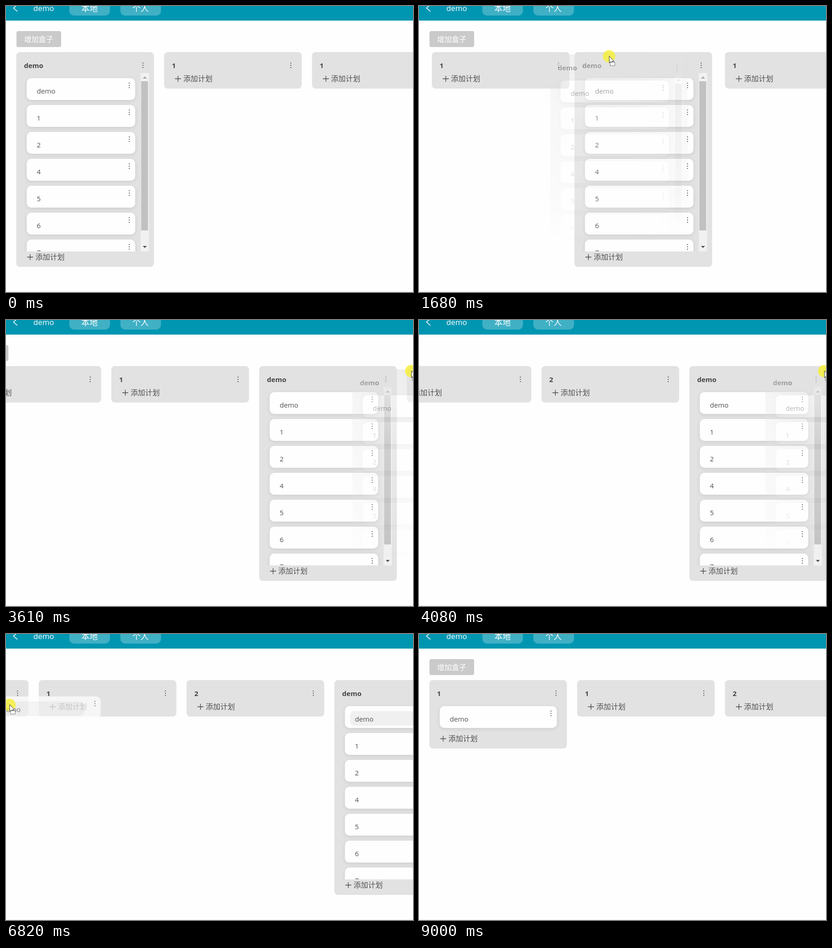
Recreate the animation shown at these times as an HTML page. Size 893 px wide and 627 px high, loop 9.38 s.

```html
<!DOCTYPE html>
<html lang="zh-CN">
<head>
<meta charset="utf-8">
<title>Board</title>
<style>
html, body { margin: 0; width: 100%; height: 100%; overflow: hidden; background: #fefefe; }
body { position: relative; font: 15.1px/24px "Open Sans", "Noto Sans CJK SC", "Noto Sans CJK", sans-serif; color: #505050; }
div, svg { position: absolute; box-sizing: border-box; white-space: nowrap; }
svg { overflow: visible; }
#bar { left: 0; top: 0; width: 100%; height: 32px; background: #0096b2; color: #fff; font-size: 16.8px; overflow: hidden; }
#bar .name { left: 60px; top: -7px; }
.tab { top: -12px; width: 89.5px; height: 33px; border-radius: 10px; background: #40b0c5; font-size: 18px; line-height: 34px; text-align: center; }
#rule { left: 0; top: 626px; width: 100%; height: 1px; background: #eee; }
#board { left: 0; top: 0; }
#add { left: 22.5px; top: 54.5px; width: 98.5px; height: 35.5px; border-radius: 4px; background: #cacaca; color: #fff; font-size: 16px; line-height: 36px; text-align: center; }
.col { left: 0; top: 101px; width: 302px; height: 80px; border-radius: 8px; background: #e2e2e2; }
.col.full { height: 471px; }
.col.one { height: 150px; }
.title { left: 17px; top: 17px; font-weight: 700; font-size: 15px; color: #444; }
.more { width: 2px; height: 2px; background: #555; box-shadow: 0 -5px #555, 0 5px #555; }
.col > .more { left: 276.5px; top: 28px; }
.plan { left: 24px; bottom: 10px; height: 24px; font-size: 16px; font-weight: 300; }
.plan div { left: 18px; }
.plan svg { left: 0; top: 5.5px; }
.list { left: 0; top: 46px; width: 302px; height: 391px; overflow: hidden; }
.one .list { height: 80px; }
.card { left: 22.5px; top: 11px; width: 238.5px; height: 48px; border-radius: 10px; background: #fefefe; box-shadow: 0 2px 8px rgba(0,0,0,.1); }
.one .card { width: 257.5px; }
.card .text { left: 22.5px; top: 15.5px; }
.card .more { right: 12px; top: 15px; }
.pill { left: 11px; right: 35.5px; top: 11px; height: 32px; border-radius: 10px; background: #f0f0f0; display: none; }
.picked .pill { display: block; }
.track { left: 272.5px; top: 0; width: 18px; height: 391px; background: #f1f1f1; }
.thumb { left: 1.5px; top: 18px; width: 15px; height: 327px; background: #c1c1c1; }
.ghost.col, .ghost.card { left: 0; top: 0; }
.ghost.col { mask-image: radial-gradient(circle at 129.5px 4px, rgba(0,0,0,.65) 0, rgba(0,0,0,.42) 100px, rgba(0,0,0,.23) 165px, rgba(0,0,0,.13) 330px, transparent 420px); }
.ghost.card { opacity: .72; clip-path: inset(0); }
#cursor { left: 0; top: 0; }
</style>
</head>
<body>
<div id="board"><div id="add">增加盒子</div></div>
<div id="rule"></div>
<div id="bar">
  <svg width="30" height="32"><path d="M25-3 16.5 4.5 25 12" fill="none" stroke="#fff" stroke-width="1.6"/></svg>
  <div class="name">demo</div>
  <div class="tab" style="left:138.5px">本地</div>
  <div class="tab" style="left:250.5px">个人</div>
</div>
<svg id="cursor" width="1" height="1">
  <circle cy=".5" r="13.5" fill="rgba(246,240,50,.8)"/>
  <path d="M.5 0V15L4 12l2.5 5.5 2-1-2.3-5H11Z" fill="#fff" stroke="#222" stroke-width=".9"/>
  <rect id="badge" x="2.5" y="13.5" width="10" height="7.5" fill="#fff" stroke="#222" stroke-dasharray="1.5 1"/>
</svg>
<script>
const LOOP = 9380, STEP = 77;
const LEFT = 22.5, PITCH = 324.4, MAX_SCROLL = 402.5;
const SWAP = 150;

// Each move starts where the last one stopped.
const origin = { x: 723, y: 587 };
const moves = [
  { from: 340, to: 570, x: 230, y: 191 },
  { from: 740, to: 1210, x: 152, y: 109 },
  { from: 1360, to: 2290, x: 841, y: 111 },    // drag the column
  { from: 2370, to: 2600, x: 880, y: 111.5 },
  { from: 2677, to: 3380, x: 889, y: 111.5 },
  { from: 3530, to: 4080, x: 889, y: 111.5 },  // rest while the board scrolls
  { from: 4250, to: 4560, x: 654, y: 178 },
  { from: 4790, to: 5255, x: 400, y: 122 },    // drag the card
  { from: 5332, to: 5720, x: 172, y: 182 },
  { from: 5790, to: 6660, x: 8, y: 155 },
  { from: 6750, to: 7210, x: 6.5, y: 154 },
  { from: 7530, to: 7830, x: 200, y: 138 },
  { from: 8010, to: 8390, x: 290, y: 180 },
  { from: 8540, to: 9000, x: 830, y: 690 }
];

const $ = id => document.getElementById(id);
const board = $('board'), cursor = $('cursor'), badge = $('badge');

function make(cls, parent, text = '') {
  const el = document.createElement('div');
  el.className = cls;
  el.textContent = text;
  parent.append(el);
  return el;
}
function makeCard(parent, text, row) {
  const card = make('card', parent);
  if (row) card.style.top = 11 + 59 * row + 'px';
  make('pill', card);
  make('text', card, text);
  make('more', card);
  return card;
}
function makeColumn(title, cards = []) {
  const col = make('col', board);
  make('title', col, title);
  make('more', col);
  const list = make('list', col);
  cards.forEach((text, row) => makeCard(list, text, row));
  if (cards.length) {
    col.classList.add('full');
    const track = make('track', list);
    make('thumb', track);
    track.insertAdjacentHTML('beforeend',
      '<svg width="18" height="391"><path d="M4.5 12 9 7.5 13.5 12Z" fill="#a3a3a3"/><path d="M4.5 379H13.5L9 383.5Z" fill="#505050"/></svg>');
  }
  const plan = make('plan', col);
  plan.innerHTML = '<svg width="13" height="13"><path d="M0 6.5H13M6.5 0V13" stroke="#444" stroke-width="1.3"/></svg><div>添加计划</div>';
  return col;
}
function makeGhost(el) {
  const ghost = el.cloneNode(true);
  ghost.classList.add('ghost');
  document.body.insertBefore(ghost, cursor);
  return ghost;
}

const demo = makeColumn('demo', ['demo', '1', '2', '4', '5', '6', '7']);
const others = ['1', '1', '2'].map(title => makeColumn(title));
const source = demo.querySelector('.card');
const dropped = makeCard(others[0].querySelector('.list'), 'demo', 0);
const colGhost = makeGhost(demo), cardGhost = makeGhost(source);
cardGhost.classList.add('picked');

const clamp = (v, max) => Math.min(max, Math.max(0, v));
const place = (el, x, y = 0) => el.style.transform = `translate(${x}px,${y}px)`;
const show = (el, on) => el.style.visibility = on ? 'visible' : 'hidden';

// Stepped time and pointer position; both hold between moves.
function pose(now) {
  const i = moves.findLastIndex(m => now >= m.from);
  if (i < 0) return { t: 0, ...origin };
  const move = moves[i], start = moves[i - 1] || origin;
  const gaps = Math.round((move.to - move.from) / STEP);
  const size = (move.to - move.from) / gaps;
  const k = Math.min(gaps, Math.floor((now - move.from + 8) / size));
  const p = (k + 1) / (gaps + 1);
  return {
    t: move.from + k * size,
    x: start.x + (move.x - start.x) * p,
    y: start.y + (move.y - start.y) * p
  };
}
function draw(now) {
  const { t, x, y } = pose(now);
  const dragCol = t >= 1360 && t < 4250, dragCard = t >= 4790 && t < 7830;
  const landed = t >= 7530;

  place(board, clamp((t - 6648) * .713, MAX_SCROLL) - clamp((t - 3450) * .73, MAX_SCROLL));

  // The dragged column trades places with each neighbour in turn.
  let slot = 0;
  others.forEach((col, i) => {
    const swapAt = [1540, 2090, 3640][i];
    const moved = 1 - (1 - clamp((t - swapAt) / SWAP, 1)) ** 2;
    slot += moved;
    place(col, LEFT + PITCH * (i + 1 - moved));
  });
  place(demo, LEFT + PITCH * slot);

  others[0].classList.toggle('one', landed);
  dropped.style.display = landed ? '' : 'none';
  dropped.classList.toggle('picked', dragCard);
  source.classList.toggle('picked', dragCard);

  show(colGhost, dragCol);
  place(colGhost, x - 129.5, y - 3.5);
  show(cardGhost, dragCard);
  place(cardGhost, x - 38.5, y - 18);

  show(cursor, t >= 340 && t < 9000);
  place(cursor, x, y);
  badge.style.display = dragCol || dragCard ? '' : 'none';
}

const start = performance.now();
function tick() {
  draw((performance.now() - start) % LOOP);
  requestAnimationFrame(tick);
}
tick();
</script>
</body>
</html>
```
